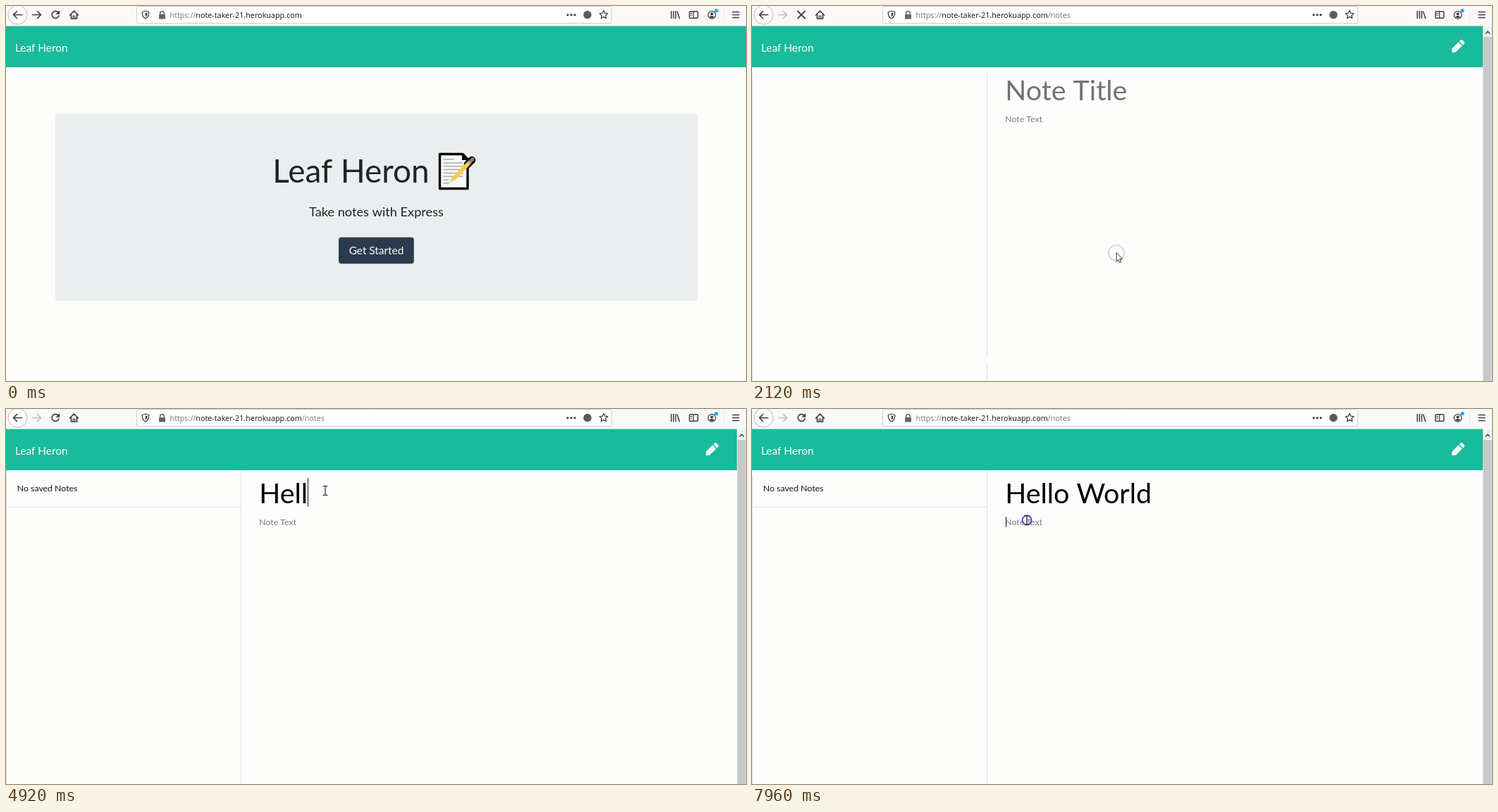
Animation of 1050 by 533 pixels, one loop 8 s. Source, as an HTML page with a canvas:

```html
<!DOCTYPE html>
<html lang="en">
<head>
<meta charset="utf-8">
<title>Leaf Heron</title>
<style>
html, body { margin: 0; width: 100%; height: 100%; overflow: hidden; background: #fdfdfd; }
canvas { display: block; }
</style>
</head>
<body>
<canvas id="stage" width="1050" height="533"></canvas>
<script>
const ctx = document.getElementById('stage').getContext('2d');
const LOOP = 8000, STEP = 40;
const BRAND = 'Leaf Heron', TYPED = 'Hello World';
const LATO = 'Lato, sans-serif', UI = '"Open Sans", sans-serif';
const PAPER = '#fdfdfc', INK = '#3f3f42', TEAL = '#18bb9b';

const NAVIGATE = 1980, LOADED = 2500;
const FIELD_X = 359.2;
const KEY_TIMES = [4320, 4520, 4760, 4920, 5120, 5280, 5480, 5720, 6120, 6360, 6600];
const CLICKS = [[1500, 1840], [3560, 3640], [7830, 8100]];
const HIGHLIGHT = [[40, 1500], [2300, 3560], [6960, 7830]];
const PATH = [
  [40, 20, 28], [320, 457, 352], [520, 457, 352], [720, 517, 334], [1300, 518, 352],
  [2300, 517, 351], [3000, 455, 119], [3240, 455, 119], [3400, 453, 116],
  [6960, 453, 116], [7560, 391, 161], [7680, 390, 158]
];

const clamp = v => Math.max(0, Math.min(1, v));
const smooth = v => v * v * (3 - 2 * v);
const mix = (a, b, k) => a + (b - a) * k;
const mixColor = (a, b, k) => `rgb(${a.map((v, i) => Math.round(mix(v, b[i], k)))})`;

function text(str, x, y, size, color, family = LATO, align = 'left') {
  ctx.font = `${size}px ${family}`;
  ctx.fillStyle = color;
  ctx.textAlign = align;
  ctx.fillText(str, x, y);
  return ctx.measureText(str).width;
}

function rect(x, y, w, h, color) {
  ctx.fillStyle = color;
  ctx.fillRect(x, y, w, h);
}

function shape(d, { fill, stroke, width = 1.5, x = 0, y = 0, turn = 0, cap = 'round' }) {
  const path = new Path2D(d);
  ctx.save();
  ctx.translate(x, y);
  ctx.rotate(turn);
  ctx.lineWidth = width;
  ctx.lineJoin = 'round';
  ctx.lineCap = cap;
  if (fill) { ctx.fillStyle = fill; ctx.fill(path); }
  if (stroke) { ctx.strokeStyle = stroke; ctx.stroke(path); }
  ctx.restore();
}

function circle(x, y, r, { fill, stroke, width = 1.5 }) {
  ctx.beginPath();
  ctx.arc(x, y, r, 0, Math.PI * 2);
  ctx.lineWidth = width;
  if (fill) { ctx.fillStyle = fill; ctx.fill(); }
  if (stroke) { ctx.strokeStyle = stroke; ctx.stroke(); }
}

function rounded(x, y, w, h, r, { fill, stroke, width = 1 }) {
  ctx.beginPath();
  ctx.roundRect(x, y, w, h, r);
  ctx.lineWidth = width;
  if (fill) { ctx.fillStyle = fill; ctx.fill(); }
  if (stroke) { ctx.strokeStyle = stroke; ctx.stroke(); }
}

function drawToolbar(onNotes, loading) {
  rect(0, 0, 1050, 29, '#f9f9f8');
  const icon = (d, x, extra = {}) => shape(d, { stroke: INK, x, y: 12.5, ...extra });

  circle(16.5, 12.5, 13.5, { fill: '#fdfdfd', stroke: '#b8b8ba', width: 1 });
  icon('M6 0H-6M-1 -5L-6 0L-1 5', 16.5, { width: 1.7 });
  icon('M-6 0H6M1 -5L6 0L1 5', 43.5, { width: 1.7, stroke: onNotes ? '#bdbdbf' : INK });
  if (loading) icon('M-5 -5L5 5M5 -5L-5 5', 70, { width: 1.8 });
  else {
    icon('M4 -3.4A5 5 0 1 0 5 1.2', 70, { width: 1.7 });
    icon('M6 -6V-1H1Z', 70, { fill: INK, width: .4 });
  }
  icon('M-6 .5L0 -5.5L6 .5M-4 -.5V5.5H4V-.5', 96.5, { width: 1.7 });
  icon('M-1.2 5V1.5H1.2V5', 96.5, { width: 1.2 });

  rounded(185.5, .5, 674, 24, 1, { fill: '#fff', stroke: '#cfcfd1' });
  icon('M0 -5.5L4.7 -4Q5 3 0 5.5Q-5 3 -4.7 -4Z', 198, { width: 1.3 });
  icon('M0 -3L2.5 -2.2Q2.5 1.5 0 3Z', 198, { fill: INK, width: .3 });
  rounded(217, 12, 9, 6.5, 1, { fill: '#656567' });
  shape('M218.7 12V10.3A2.8 2.8 0 0 1 224.3 10.3V12', { stroke: '#656567', width: 1.5 });

  let x = 232.5;
  x += text('https://', x, 16.7, 10.8, '#77777a', UI);
  x += text('note-taker-21.herokuapp.com', x, 16.7, 10.8, '#141416', UI);
  if (onNotes) text('/notes', x, 16.7, 10.8, '#77777a', UI);

  for (const dx of [-5, 0, 5]) circle(802 + dx, 12.7, 1.6, { fill: INK });
  circle(825, 12.5, 5.7, { fill: '#5b5b5e' });
  let star = '';
  for (let i = 0; i < 10; i++) {
    const r = i % 2 ? 2.9 : 6.2, a = i * Math.PI / 5;
    star += `${i ? 'L' : 'M'}${r * Math.sin(a)} ${-r * Math.cos(a)}`;
  }
  icon(star + 'Z', 848, { width: 1.3 });

  icon('M-5.5 -5V5M-2.3 -5V5M.8 -5V5M3 -4.5L6 5', 949.5, { width: 1.5 });
  rounded(969.7, 7.7, 12, 9.6, 1.5, { stroke: INK, width: 1.5 });
  shape('M975.5 8V17M971.5 10.5H973.5M971.5 13H973.5', { stroke: INK, width: 1.2 });
  circle(1001.5, 12.8, 5.4, { stroke: INK, width: 1.2 });
  circle(1001.5, 11.3, 2, { fill: INK });
  shape('M998 15.5Q1001.5 12 1005 15.5Q1001.5 18.5 998 15.5Z', { fill: INK });
  circle(1008, 6.5, 2.6, { fill: '#18a9ee' });
  rect(1018, 4, 1, 18, '#ececed');
  icon('M-4.5 -4H4.5M-4.5 0H4.5M-4.5 4H4.5', 1035.5, { width: 1.4 });
}

function drawNavbar(width) {
  rect(0, 28.5, width, 58.5, TEAL);
  text(BRAND, 13, 64.5, 15.4, '#fff');
}

function drawMemoIcon() {
  shape('M615.5 210.5H648L655 218V259.5H615.5Z', { fill: '#f8f8f8', stroke: '#050505', width: 3.4 });
  shape('M647 211V219H655Z', { fill: '#050505' });
  shape('M621 218H635', { stroke: '#aaa', width: 1.6 });
  for (let y = 223; y < 253; y += 4.8)
    shape(`M621 ${y}H${y > 246 ? 628 : 648}`, { stroke: '#aaa', width: 1.5 });
  shape('M655 225L661 219', { stroke: '#080808', width: 10.5 });
  shape('M633.5 247L657 223', { stroke: '#f8cb4c', width: 5.6, cap: 'butt' });
  shape('M629 251L631.5 245L635.5 249Z', { fill: '#efd3a2' });
  shape('M657 223L659 221', { stroke: '#b8b8b8', width: 5, cap: 'butt' });
  shape('M660 220L662 218', { stroke: '#a57963', width: 5 });
}

function drawHome(t) {
  drawNavbar(1050);
  rounded(70, 153, 911.5, 266, 4, { fill: '#eaeeee' });
  text(BRAND, 489.5, 251, 45.9, '#202426', LATO, 'center');
  drawMemoIcon();
  text('Take notes with Express', 525.5, 298.5, 18.2, '#202426', LATO, 'center');

  const hover = clamp((t - 720) / 150), press = clamp((t - CLICKS[0][0]) / 80);
  const hoverShade = mixColor([42, 59, 77], [31, 44, 57], hover);
  rounded(472, 328.7, 106.8, 37.6, 4, { fill: hoverShade });
  if (press > 0) {
    ctx.globalAlpha = press;
    rounded(472, 328.7, 106.8, 37.6, 4, { fill: '#1a262f', stroke: '#7d8992', width: 1.3 });
    ctx.globalAlpha = 1;
  }
  text('Get Started', 525.5, 353.3, 15.4, '#fff', LATO, 'center');
}

function drawCaret(x, y, h) {
  rect(Math.round(x), y, 1, h, '#222');
}

function drawNotes(t) {
  const line = '#e0e0ee', loaded = t >= LOADED;
  drawNavbar(1037);
  shape('M-12 0L-8 -3.7H5V3.7H-8ZM6.7 -3.7H9Q11 -3.7 11 -1.7V1.7Q11 3.7 9 3.7H6.7Z',
    { fill: '#f3f8f7', x: 1001.5, y: 57.5, turn: -Math.PI / 4 });

  rect(1037, 29, 13, 504, '#f0f0f0');
  rect(1037.5, 44, 12, 489, '#c9c9c9');
  shape('M1041.3 39L1044 36L1046.7 39', { stroke: '#505050', width: 1.6 });

  rect(0, 95, 1, 438, line);
  if (loaded) {
    rect(333, 88, 1, 445, line);
    rect(0, 138.5, 333, 1, line);
    text('No saved Notes', 15.8, 117.3, 12.3, '#111');
  } else {
    rect(333, 95, 1, 403, line);
    rect(333, 507, 1, 26, line);
  }

  const count = KEY_TIMES.filter(k => t >= k).length;
  const value = TYPED.slice(0, count);
  const width = text(value || 'Note Title', FIELD_X, 134, 39.4, value ? '#000' : '#717372');
  text('Note Text', FIELD_X, 165, 12.3, '#777978');

  const lastKey = count ? KEY_TIMES[count - 1] : 4100;
  const blinkOn = t >= lastKey && (t - lastKey) % 1060 < 530;
  if (t >= CLICKS[2][0]) drawCaret(FIELD_X + .5, 153, 15);
  else if (blinkOn) drawCaret(FIELD_X + (value ? width : 0), 98, 41);
}

function pointerAt(t) {
  let i = PATH.findIndex(p => p[0] > t);
  if (i < 0) i = PATH.length;
  const a = PATH[Math.max(0, i - 1)], b = PATH[Math.min(i, PATH.length - 1)];
  const k = a === b ? 0 : smooth(clamp((t - a[0]) / (b[0] - a[0])));
  return [mix(a[1], b[1], k), mix(a[2], b[2], k)];
}

function drawRing(t, x, y) {
  if (HIGHLIGHT.some(([from, to]) => t >= from && t < to))
    circle(x, y, 18.5, { stroke: '#f2ef25', width: 2 });
  for (const [down, up] of CLICKS) {
    if (t < down || t > up + 360) continue;
    const squeeze = clamp((t - down) / 100), release = clamp((t - up) / 360);
    ctx.globalAlpha = .85 * (1 - release);
    circle(x, y, mix(18.5, 6.5, squeeze) + 6 * release, {
      stroke: mixColor([242, 239, 37], [48, 48, 205], squeeze), width: 2
    });
    ctx.globalAlpha = 1;
  }
}

function drawPointer(t) {
  if (t < PATH[0][0]) return;
  const [x, y] = pointerAt(t);
  const onHome = t < NAVIGATE;
  const overButton = onHome && x > 472 && x < 579 && y > 329 && y < 366;
  drawRing(t, x, y);
  if (overButton) {
    shape('M-1.5 1Q0 -1 1.5 1V6L3 5.6L4 7L5.5 6.6L6.2 8L7.2 7.8V12L5.5 16H-1.5L-5 10Q-5 8 -3 9L-1.5 10.5Z',
      { fill: '#fff', stroke: '#17202a', width: .8, x, y });
  } else if (!onHome && y < 200) {
    shape('M-3 -6.5H-1L0 -5.7L1 -6.5H3M0 -5.7V5.7M-3 6.5H-1L0 5.7L1 6.5H3',
      { stroke: '#222', width: 1.2, x, y });
  } else {
    shape('M0 0V12L2.8 9.4L4.6 13.6L6.6 12.7L4.8 8.6H8.4Z',
      { fill: '#fff', stroke: '#222', width: .9, x, y });
  }
}

function frame(now) {
  const t = Math.floor(now % LOOP / STEP) * STEP;
  const onNotes = t >= NAVIGATE;
  rect(0, 0, 1050, 533, PAPER);
  drawToolbar(onNotes, onNotes && t < LOADED);
  if (onNotes) drawNotes(t);
  else drawHome(t);
  drawPointer(t);
  requestAnimationFrame(frame);
}
requestAnimationFrame(frame);
</script>
</body>
</html>
```
